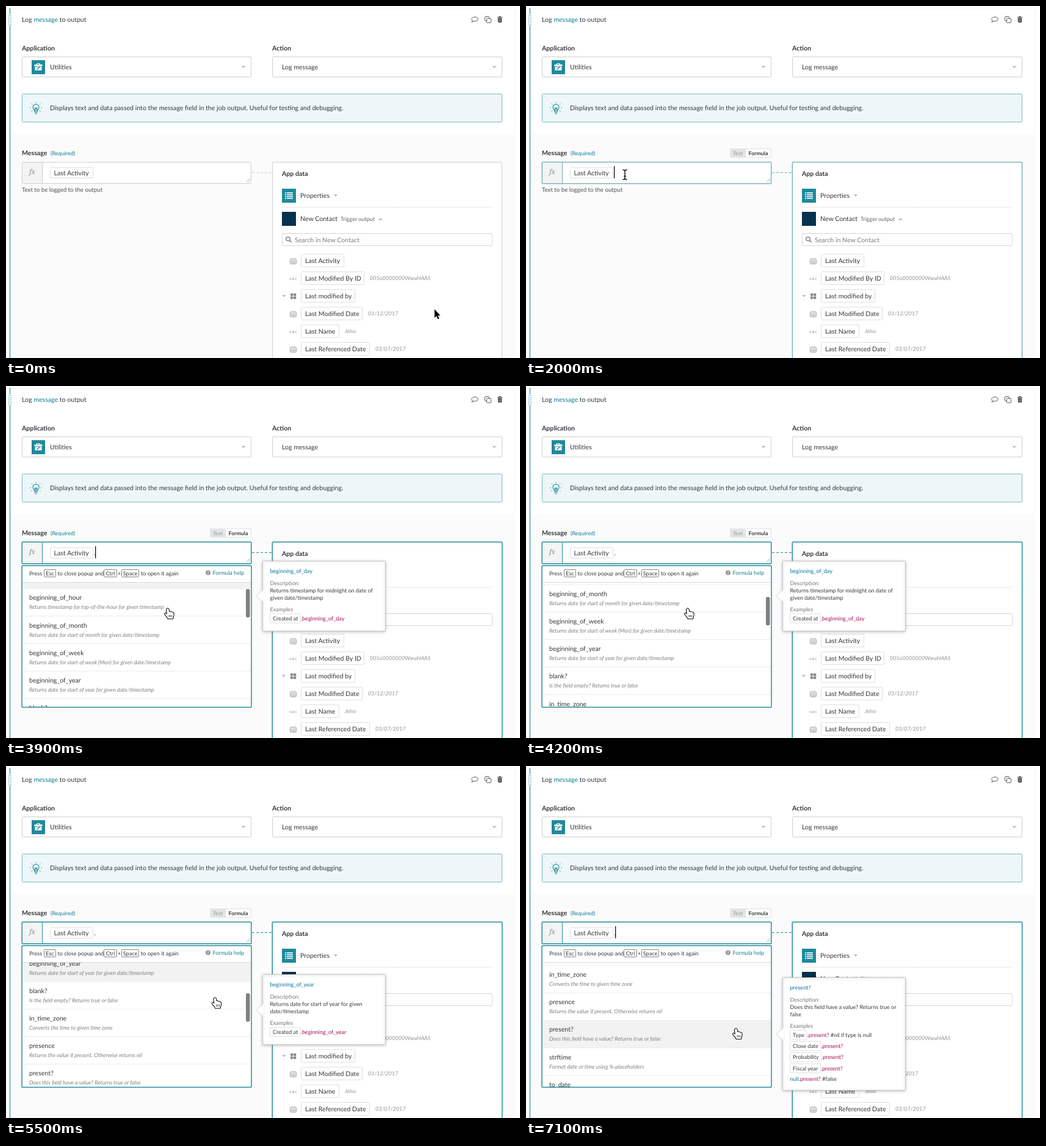
An HTML page with a canvas for the animation above (7200 ms loop, 842 by 578 pixels).

```html
<!DOCTYPE html>
<html lang="en">
<head>
<meta charset="utf-8">
<title>Formula mode</title>
<style>
  html, body { margin: 0; width: 100%; height: 100%; overflow: hidden; background: #fff; }
  canvas { display: block; }
</style>
</head>
<body>
<canvas id="stage" width="842" height="578"></canvas>
<script>
const ctx = document.getElementById('stage').getContext('2d');
const LOOP = 7200, STEP = 100;
const TEAL = '#1f8a9c', INK = '#33393d', LINK = '#0f7c91', BLUE = '#00749b';
const GREY = '#8f9396', LINE = '#cdcfd0', CODE = '#a60a55';
const BODY = 10.6, SMALL = 9.06, ROW = 45.2, LIST_TOP = 322;

// Keeps glyph advances fractional, so lines have their true length.
ctx.textRendering = 'geometricPrecision';

const methods = [
  ['beginning_of_day', 'Returns timestamp for midnight on date of given date/timestamp'],
  ['beginning_of_hour', 'Returns timestamp for top-of-the-hour for given timestamp'],
  ['beginning_of_month', 'Returns date for start of month for given date/timestamp'],
  ['beginning_of_week', 'Returns date for start of week (Mon) for given date/timestamp'],
  ['beginning_of_year', 'Returns date for start of year for given date/timestamp'],
  ['blank?', 'Is the field empty? Returns true or false'],
  ['in_time_zone', 'Converts the time to given time zone'],
  ['presence', 'Returns the value if present. Otherwise returns nil'],
  ['present?', 'Does this field have a value? Returns true or false'],
  ['strftime', 'Format date or time using %-placeholders'],
  ['to_date', 'Converts the value to a date']
];

// Tooltip text by method index: description lines, then [pill, note] examples.
const tips = {
  0: [['Returns timestamp for midnight on date of', 'given date/timestamp'], [['Created at']]],
  3: [['Returns date for start of week (Mon) for', 'given date/timestamp'], [['Created at']]],
  4: [['Returns date for start of year for given', 'date/timestamp'], [['Created at']]],
  7: [['Returns the value if present. Otherwise', 'returns nil'], [['Created at']]],
  8: [['Does this field have a value? Returns true or', 'false'],
    [['Type', '#nil if type is null'], ['Close date'], ['Probability'], ['Fiscal year'], ['', '#false']]]
};

const fields = [
  ['date', 'Last Activity', 70],
  ['abc', 'Last Modified By ID', 103, '005o0000000WwuHAAS'],
  ['group', 'Last modified by', 88],
  ['date', 'Last Modified Date', 100, '01/12/2017'],
  ['abc', 'Last Name', 62, 'Jelvo'],
  ['date', 'Last Referenced Date', 112, '03/07/2017']
];

const cursorPath = [[0, 702, 498], [200, 702, 498], [800, 546, 412], [1500, 165, 275], [1800, 162, 277],
  [2500, 162, 277], [2900, 190, 283], [3200, 190, 283], [3700, 265, 366], [4500, 265, 366],
  [4700, 342, 381], [6300, 343, 382], [6400, 343, 384], [6900, 344, 432]];
const scrollPath = [[0, 0], [3700, 0], [4200, 86.5], [4500, 125], [4900, 125], [5500, 194], [6000, 266]];
// Start time, selected method, scroll offset at that moment.
const selections = [[0, 0, 0], [4600, 3, 125], [4700, 4, 125], [6400, 7, 266], [6700, 8, 266]];

const clamp = v => Math.max(0, Math.min(1, v));

function track(path, t) {
  const i = path.findIndex(p => p[0] > t);
  if (i < 0) return path[path.length - 1].slice(1);
  const [a, b] = [path[i - 1], path[i]];
  const k = (t - a[0]) / (b[0] - a[0]);
  return a.slice(1).map((v, n) => v + (b[n + 1] - v) * k);
}

function text(str, x, y, { size = BODY, color = INK, style = '', family = 'Lato, sans-serif', align = 'left' } = {}) {
  ctx.font = `${style} ${size}px ${family}`;
  ctx.fillStyle = color;
  ctx.textAlign = align;
  ctx.fillText(str, x, y + size * 0.36);
  return x + ctx.measureText(str).width;
}

function rect(x, y, w, h, fill, stroke, width = 1, radius = 0) {
  ctx.beginPath();
  ctx.roundRect(x + 0.5, y + 0.5, w - 1, h - 1, radius);
  if (fill) { ctx.fillStyle = fill; ctx.fill(); }
  if (stroke) { ctx.strokeStyle = stroke; ctx.lineWidth = width; ctx.stroke(); }
}

// A box whose border turns teal and grows outwards as focus goes from 0 to 1.
function focusBox(x, y, w, h, focus) {
  const grow = focus * 0.25;
  rect(x - grow, y - grow, w + 2 * grow, h + 2 * grow, '#fff', focusColor(focus), 1 + focus * 0.5, 1);
}

function block(x, y, w, h, color) {
  ctx.fillStyle = color;
  ctx.fillRect(x, y, w, h);
}

function line(points, color, width = 1, dash = []) {
  ctx.beginPath();
  points.forEach(([x, y]) => ctx.lineTo(x, y));
  ctx.strokeStyle = color;
  ctx.lineWidth = width;
  ctx.setLineDash(dash);
  ctx.stroke();
  ctx.setLineDash([]);
}

function shape(d, x, y, fill, stroke, width = 1) {
  const path = new Path2D(d);
  ctx.save();
  ctx.translate(x, y);
  if (stroke) { ctx.strokeStyle = stroke; ctx.lineWidth = width; ctx.lineJoin = 'round'; ctx.stroke(path); }
  if (fill) { ctx.fillStyle = fill; ctx.fill(path); }
  ctx.restore();
}

const arrowDown = (x, y) => shape('M-3.5 -1.5H3.5L0 2Z', x, y, '#b9bcbe');

function pill(label, x, y, w, h, size = BODY, pad = 6.5) {
  rect(x, y - h / 2, w, h, '#fff', '#dedfe0', 1, 1);
  text(label, x + pad, y, { size });
}

function drawHeader() {
  block(7, 210, 826, 368, '#fbfbfb');
  line([[7, 3.5], [833, 3.5]], '#f7f7f7');
  line([[833.5, 3], [833.5, 578]], '#f8f8f8');
  line([[6.5, 3], [6.5, 578]], '#55a5b1', 1.5);
  block(3, 14, 7, 18, '#fff');
  for (let y = 15; y < 31; y += 3) for (const x of [4, 7]) block(x, y, 1.5, 1.5, '#69afba');

  let x = text('Log ', 26, 22);
  x = text('message', x, 22, { color: LINK });
  text(' to output', x, 22);

  shape('M0 -4C7 -4 7 3 0 3C-1 3 -1.5 3 -2 2.7L-5 4.5L-4 1.6C-7 -1 -4 -4 0 -4Z', 768, 22, null, '#555');
  rect(784, 17, 8, 8, '#fff', '#555', 1, 1);
  rect(787, 20, 8, 8, '#fff', '#555', 1, 1);
  shape('M-4 -4H-1.5V-5.2H1.5V-4H4V-2.7H-4ZM-3.4 -2H3.4L3 5H-3Z', 809, 22, '#444');
  for (const dx of [-1.5, 0, 1.5]) line([[809 + dx, 21.5], [809 + dx, 25.5]], '#ccc', 0.6);

  text('Application', 26, 69.5, { style: 'bold' });
  text('Action', 436, 69.5, { style: 'bold' });
  rect(26, 83, 376, 34, '#fff', LINE, 1, 1);
  rect(436, 83, 377, 34, '#fff', LINE, 1, 1);
  arrowDown(389, 100);
  arrowDown(800, 100);
  block(42, 89, 22, 23, TEAL);
  shape('M-2.5 -4V-5.5H2.5V-4', 53, 100, null, '#fff', 1.2);
  block(46.5, 96, 13, 3, '#fff');
  block(47.5, 99.7, 11, 6, '#fff');
  line([[50.5, 104.5], [55.5, 99.5]], TEAL, 1.4);
  text('Utilities', 72, 100);
  text('Log message', 452, 100);

  rect(26, 144, 787, 47, '#edf6f8', '#76bac5', 1, 1);
  shape('M-2.5 5V3C-6.8 -1 -5 -6.5 0 -6.5S6.8 -1 2.5 3V5ZM-2.5 7H2.5M-1.5 9H1.5M-2 -1L-.8 4M2 -1L.8 4M-2 -1L0 .5L2 -1', 49, 168, null, TEAL, 1.1);
  shape('M0 -8.5V-10M-6 -6.5L-7.3 -7.8M6 -6.5L7.3 -7.8M-8 -1H-9.5M8 -1H9.5M-6.5 4L-7.7 5M6.5 4L7.7 5', 49, 168, null, TEAL);
  text('Displays text and data passed into the message field in the job output. Useful for testing and debugging.', 72, 167.5);
}

function focusColor(k) {
  const mix = (a, b) => Math.round(a + (b - a) * k);
  return `rgb(${mix(205, 38)},${mix(207, 142)},${mix(208, 158)})`;
}

function drawField(t, focus) {
  const edge = focusColor(focus);
  text('Message', 26, 241, { style: 'bold' });
  text('(Required)', 73, 241.5, { size: SMALL, color: LINK });
  if (t >= 1800) {
    rect(334, 234, 68, 15, '#fff', '#dfe0e1');
    block(334, 234, 26, 15, '#e3e4e5');
    text('Text', 347, 241.5, { size: 8.8, color: '#a9adaf', align: 'center', style: 'bold' });
    text('Formula', 380.5, 241.5, { size: 8.8, align: 'center', style: 'bold' });
  }
  focusBox(26, 256, 376, 36, focus);
  block(27, 257, 32, 34, '#f3f4f4');
  line([[59.5, 256], [59.5, 292]], edge);
  text('fx', 43, 272.5, { size: 11, style: 'italic', color: '#888', family: '"Noto Serif", serif', align: 'center' });
  pill('Last Activity', 72, 274, 71, 18);
  line([[394, 289], [400, 283]], '#999', 0.8);
  line([[397, 289], [400, 286]], '#999', 0.8);
  text('Text to be logged to the output', 26, 302, { size: 9.7, color: '#4a5054' });

  const typed = t >= 2600;
  if (typed) text('.', 144.5, 274);
  const phase = t % 1060;
  const caret = typed ? phase > 330 && phase < 860 : t >= 1900 && t < 2400;
  if (caret) block(typed ? 146 : 144, 263, 1.3, 20, '#111');
  line([[403, 273.5], [436, 273.5]], edge, 1 + focus * 0.2, [4, 3]);
}

function drawTypeIcon(kind, y) {
  const color = '#a0a3a5';
  if (kind === 'abc') {
    text('A B C', 470.5, y + 1, { size: 5, style: 'bold', color, align: 'center' });
  } else if (kind === 'group') {
    for (const dx of [0, 5]) for (const dy of [0, 5]) block(466 + dx, y - 4 + dy, 4.2, 4.2, '#858a8d');
    arrowDown(455, y);
  } else {
    rect(465, y - 3, 11, 9, null, color, 1, 1);
    for (const dy of [0, 3]) line([[465, y + dy], [476, y + dy]], color, 0.8);
    for (const dx of [3, 5.5, 8]) line([[465 + dx, y], [465 + dx, y + 5]], color, 0.7);
    for (const dx of [3, 8]) line([[465 + dx, y - 4.5], [465 + dx, y - 2]], color);
  }
}

function drawAppData(focus) {
  focusBox(436, 256, 377, 330, focus);
  text('App data', 452, 275, { style: 'bold' });
  block(452, 300, 23, 23, TEAL);
  for (let y = 306; y < 317; y += 3) {
    block(457, y, 2, 1.6, '#fff');
    block(460, y, 10, 1.6, '#fff');
  }
  text('Properties', 482, 311.5);
  arrowDown(540, 311);
  line([[452, 330.5], [797, 330.5]], '#dcdddd', 1, [2, 1]);
  block(452, 338, 23, 23, '#06324d');
  text('New Contact', 482, 349.5);
  text('Trigger output', 548, 350, { size: SMALL, color: '#5c6266' });
  shape('M-3.5 1.5H3.5L0 -2Z', 613.5, 350, '#b9bcbe');
  rect(452, 373, 345, 21, '#fff', '#d5d7d8', 1, 1);
  ctx.beginPath();
  ctx.arc(462, 382.5, 3.2, 0, Math.PI * 2);
  ctx.strokeStyle = '#777';
  ctx.lineWidth = 1.3;
  ctx.stroke();
  line([[464.4, 385], [467.5, 388]], '#777', 1.6);
  text('Search in New Contact', 473, 384, { color: '#7b8083' });
  fields.forEach(([kind, label, width, value], i) => {
    const y = 418 + i * 29;
    drawTypeIcon(kind, y);
    pill(label, 483, y, width + 1, 22, BODY, 7);
    if (value) text(value, 483 + width + 10, y, { size: SMALL, style: 'italic', color: GREY });
  });
}

function drawKey(label, x, w) {
  rect(x, 301, w, 13, '#fff', '#777', 0.9, 1);
  text(label, x + w / 2, 307.5, { size: SMALL, align: 'center' });
}

function drawPopup(t, scroll, selected) {
  rect(25.5, 294.5, 377, 233.5, '#fff', '#268e9e', 1.5, 1);
  const small = { size: SMALL };
  text('Press', 38, 307.5, small);
  drawKey('Esc', 62, 20);
  text('to close popup and', 84.5, 307.5, small);
  drawKey('Ctrl', 160, 22);
  text('+', 183, 307.5, small);
  drawKey('Space', 189, 29);
  text('to open it again', 221, 307.5, small);
  ctx.beginPath();
  ctx.arc(331, 306.5, 4, 0, Math.PI * 2);
  ctx.fillStyle = '#999';
  ctx.fill();
  text('?', 331, 306.5, { size: 6.5, style: 'bold', color: '#fff', align: 'center' });
  text('Formula help', 338.5, 306.5, { size: SMALL, color: LINK });

  ctx.save();
  ctx.beginPath();
  ctx.rect(27, LIST_TOP, 374, 205);
  ctx.clip();
  methods.forEach(([name, about], i) => {
    const top = LIST_TOP + i * ROW - scroll;
    if (i === selected) block(26, top, 376, ROW, '#f2f2f2');
    line([[26, top + ROW], [402, top + ROW]], '#ececec');
    text(name, 38, top + 15);
    text(about, 38, top + 30.5, { size: SMALL, style: 'italic', color: '#7d8285' });
  });
  line([[26, 322.5], [402, 322.5]], '#d8dada');
  if (t >= 3700 && t < 6800) rect(392.5, 324 + scroll * 0.25, 7.5, 48, '#808080', null, 1, 3.5);
  ctx.restore();
}

function drawTip(index, y) {
  const [about, examples] = tips[index];
  const height = examples.length > 1 ? 186 : 116;
  const top = Math.round(y - height / 2);
  const small = { size: SMALL }, label = { size: SMALL, color: '#707579' };
  ctx.save();
  ctx.shadowColor = 'rgba(0,0,0,.22)';
  ctx.shadowBlur = 5;
  ctx.shadowOffsetY = 1;
  rect(420, top, 202, height, '#fff', '#c5c7c8', 1, 1);
  ctx.restore();
  shape('M11.5 -10L0 0L11.5 10Z', 410, y, '#fff');
  line([[420.5, y - 10], [410, y], [420.5, y + 10]], '#d0d2d3');

  const name = methods[index][0];
  text(name, 432.5, top + 16.5, { size: SMALL, color: BLUE });
  text('Description:', 432.5, top + 36.5, label);
  about.forEach((str, i) => text(str, 432.5, top + 48.5 + i * 12, small));
  text('Examples', 432.5, top + 79.5, label);
  examples.forEach(([object, note], i) => {
    const rowY = top + 94.5 + i * 18.3 - (object ? 0 : 1);
    let x;
    if (object) {
      ctx.font = `${SMALL}px Lato, sans-serif`;
      const width = ctx.measureText(object).width + 9.5;
      pill(object, 432, rowY, width, 16, SMALL, 5);
      x = 432 + width;
    } else {
      x = text('null', 432.5, rowY, { size: SMALL, color: BLUE });
    }
    x = text('.' + name, x, rowY, { size: SMALL, color: CODE });
    if (note) text(' ' + note, x, rowY, small);
  });
}

function drawCursor(x, y, open) {
  if (open && y > LIST_TOP) {
    shape('M-1.5 0C0 -1.3 1.4 -.5 1.6 1L2.2 5C3 4.2 4.5 4.5 4.8 5.4C5.8 4.8 7 5.2 7.2 6.2C8.6 5.6 9.6 6.5 9.6 8C9.8 11 8.6 12 8.2 16H.6C0 13.5 -3 11 -4.7 8.7C-5.3 7.2 -3.6 6.8 -2.6 7.7L-1 9L-2 2Z',
      x, y, '#fff', '#111', 2.2);
    for (const dx of [2, 4.3, 6.6]) line([[x + dx, y + 10], [x + dx + 0.2, y + 13.5]], '#111', 0.8);
  } else if (x > 60 && x < 402 && y > 256 && y < 292) {
    const beam = 'M-3.5 -8C-1.5 -8 0 -7.5 0 -6C0 -7.5 1.5 -8 3.5 -8M0 -6V6M-3.5 8C-1.5 8 0 7.5 0 6C0 7.5 1.5 8 3.5 8M-1.7 2.5H1.7';
    shape(beam, x, y, null, '#fff', 3);
    shape(beam, x, y, null, '#111', 1.4);
  } else {
    shape('M0 0V14L3.2 11L5.4 16.3L7.7 15.3L5.5 10.2H9.6Z', x, y, '#000', '#fff', 1.8);
  }
}

function draw(t) {
  ctx.fillStyle = '#fff';
  ctx.fillRect(0, 0, 842, 578);
  const focus = clamp((t - 1800) / 350);
  const open = t >= 2700;
  const [scroll] = track(scrollPath, t);
  const [x, y] = track(cursorPath, t);
  drawHeader();
  drawAppData(focus);
  drawField(t, focus);
  if (open) {
    const [, selected, offset] = selections.filter(s => s[0] <= t).pop();
    drawPopup(t, scroll, selected);
    drawTip(selected, LIST_TOP + ROW * (selected + 0.5) - offset);
  }
  drawCursor(x, y, open);
}

function tick() {
  draw(Math.floor(performance.now() % LOOP / STEP) * STEP);
  requestAnimationFrame(tick);
}
tick();
</script>
</body>
</html>
```
